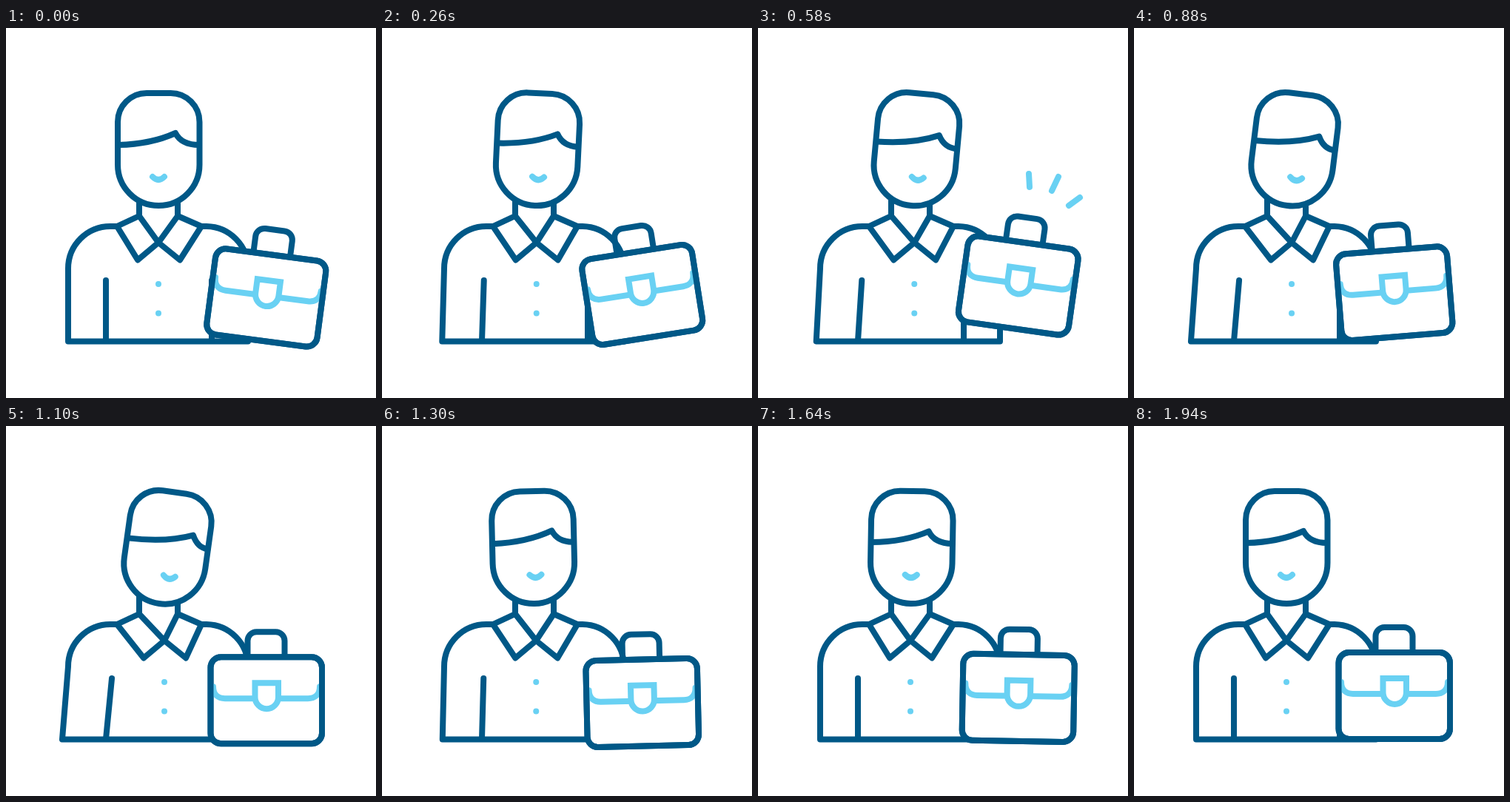
An HTML page with a canvas for the animation above (2 s loop, 500x500 px).

```html
<!DOCTYPE html>
<html lang="en">
<head>
<meta charset="utf-8">
<title>Man with briefcase</title>
<style>
html, body { margin: 0; width: 100%; height: 100%; overflow: hidden; background: #fff; }
canvas { display: block; width: 500px; height: 500px; }
</style>
</head>
<body>
<canvas id="stage" width="500" height="500"></canvas>
<script>
const ctx = document.getElementById('stage').getContext('2d');
const DARK = '#005887', LIGHT = '#69d1f3';
const LOOP = 2000, STEP = 20, START = 100, TURN = 1080, END = 1940;

const progress = (t, from, to) => Math.min(1, Math.max(0, (t - from) / (to - from)));
const ease = (t, from, to) => (1 - Math.cos(Math.PI * progress(t, from, to))) / 2;
const wave = turns => Math.sin(2 * Math.PI * turns);

// Quick start, slow rise, then a soft return that is over at `end`.
const lean = (t, end) => 8.1 * progress(t, START, TURN) ** 0.6 * (1 - ease(t, TURN, end));

// Fading shake of the briefcase, and the last small swing of head and case.
const shake = t => -9 * wave((t - START) / 640) * (1 - progress(t, START, TURN + 20) ** 3);
const swing = t => -1.5 * wave(progress(t, TURN + 80, END));

// Jump up, drop below the rest position, come back.
const lift = t => -16.5 * ease(t, START, 580) + 26.1 * ease(t, 580, 1260) - 9.6 * ease(t, 1260, 1860);

function draw(d, color = DARK, fill, join = 'round') {
  const path = new Path2D(d);
  if (fill) {
    ctx.fillStyle = fill;
    ctx.fill(path);
  }
  ctx.strokeStyle = color;
  ctx.lineJoin = join;
  ctx.stroke(path);
}

function box(x, y, w, h, r) {
  const path = new Path2D();
  path.roundRect(x, y, w, h, r);
  return path;
}

function turned(x, y, degrees, dy, paint) {
  ctx.save();
  ctx.translate(x, y + dy);
  ctx.rotate(degrees * Math.PI / 180);
  ctx.translate(-x, -y);
  paint();
  ctx.restore();
}

function drawBody(b) {
  draw('M180 225V254M232 225V254');
  draw(`M150 268H141A57 57 0 0 0 84 325L${84 - b} 423.5H327V325A57 57 0 0 0 271 268H264`);
  draw(`M${135 + b} 341L135 423M278 341V423`);
  draw(`M180 254L150 268L${178 + b} 313.5L${206 + b} 290Z`);
  draw(`M232 254L264 268L${235 + b} 313.5L${206 + b} 290Z`);
  ctx.fillStyle = LIGHT;
  for (const y of [346, 385.5]) {
    ctx.beginPath();
    ctx.arc(206 + b, y, 4, 0, 7);
    ctx.fill();
  }
}

function drawHead(b) {
  draw(box(151, 88, 110.5, 152, [39, 39, 55.25, 55.25]), DARK, '#fff');
  // Hair and mouth slide across the face as it turns.
  const tip = 229 + b * 1.25, mouth = 206 + b * 1.1;
  draw(`M152 158Q${196 + b} 157 ${tip} 142Q${tip + 8} 158 261 158`);
  draw(`M${mouth - 8} 201Q${mouth} 209 ${mouth + 8} 201`, LIGHT);
}

function drawCase() {
  const frame = box(276.5, 306, 150.5, 117, 14);
  draw('M326.5 304V284A12 12 0 0 1 338.5 272H364.5A12 12 0 0 1 376.5 284V304');
  draw(frame, DARK, '#fff');
  draw('M280 346C280 357 287 362 296 362H408C417 362 424 357 424 346', LIGHT);
  draw('M336.5 341H368V360A15.75 16 0 0 1 336.5 360Z', LIGHT, '#fff', 'miter');
  draw(frame);
}

function drawMarks(t) {
  const head = progress(t, 420, 560), tail = progress(t, 620, 780);
  if (head === 0 || tail === 1) return;
  for (const [x, y, dx, dy] of [[367, 215, -1, -18], [397, 220, 9, -19], [420, 240, 15, -11]]) {
    draw(`M${x + dx * tail} ${y + dy * tail}L${x + dx * head} ${y + dy * head}`, LIGHT);
  }
}

function frame(now) {
  const t = Math.floor(now % LOOP / STEP) * STEP;
  const b = lean(t, 1420);
  ctx.fillStyle = '#fff';
  ctx.fillRect(0, 0, 500, 500);
  ctx.lineWidth = 8;
  ctx.lineCap = 'round';
  drawBody(b);
  turned(206, 245, lean(t, 1300) + swing(t), 0, () => drawHead(b));
  turned(352, 364.5, shake(t) + swing(t), lift(t), drawCase);
  drawMarks(t);
  requestAnimationFrame(frame);
}
frame(0);
</script>
</body>
</html>
```
